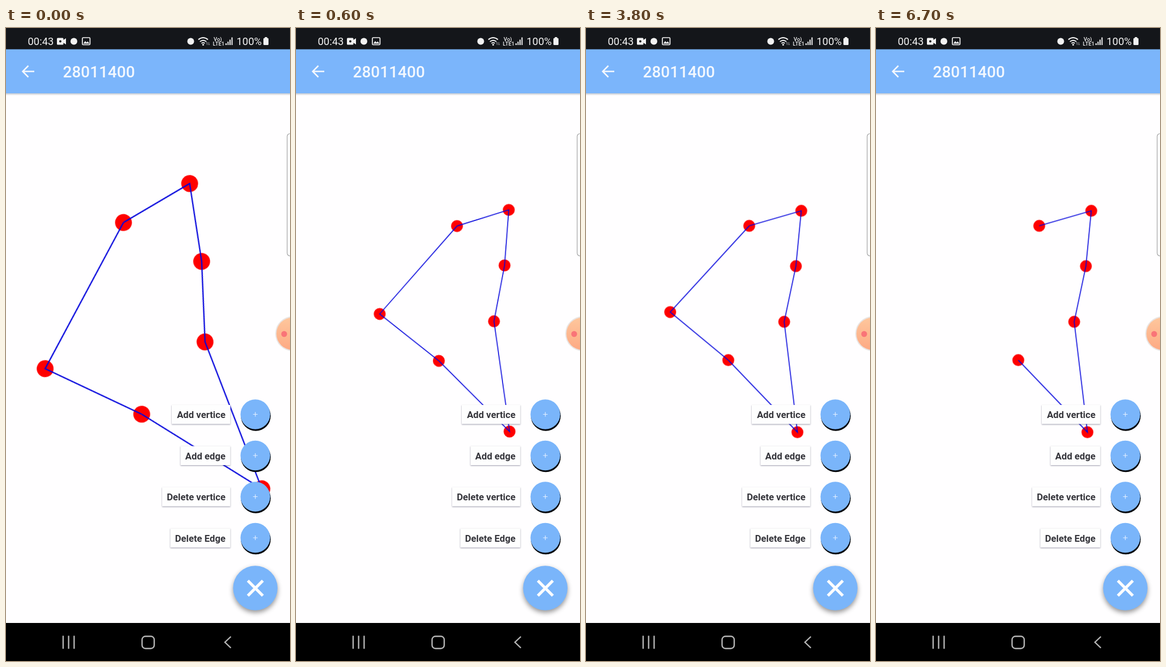
These frames come from a looping animation (502x1115 px, 8 s). An HTML page:

```html
<!DOCTYPE html>
<html lang="en">
<head>
<meta charset="utf-8">
<title>Graph editor</title>
<style>
html, body { margin: 0; width: 100%; height: 100%; overflow: hidden; background: #fffeff; }
svg { display: block; width: 502px; height: 1115px; font-family: Roboto, "Noto Sans", sans-serif; }

.dots { fill: none; stroke: #fe0000; stroke-width: 21; stroke-linecap: round; }
.edges { fill: none; stroke: #0505dc; stroke-width: 1.6; }
.label rect { fill: #fefefe; filter: drop-shadow(0 1.5px 1px rgba(0, 0, 40, .4)); }
.label text { font-size: 16.7px; font-weight: 700; fill: #36363c; text-anchor: end; }
.status { fill: #f2f2f2; }
.line { fill: none; stroke: #f2f2f2; }
.nav { fill: none; stroke: #b4b4b4; stroke-width: 2.4; }
.soft { filter: drop-shadow(0 4px 4px rgba(0, 0, 0, .42)); }

/* The pinch advances in 100 ms steps */
.graph { transform-origin: 0 0; animation: pinch 8s step-end infinite; }
.removed { animation: remove 8s step-end infinite; }

@keyframes pinch {
  0%     { transform: translate(284.5px, 524.7px) rotate(-14.35deg) scale(1.417); }
  1.25%  { transform: translate(285.6px, 521.7px) rotate(-15.2deg) scale(1.38); }
  2.5%   { transform: translate(286.9px, 518.4px) rotate(-16deg) scale(1.334); }
  3.75%  { transform: translate(291px, 511.5px) rotate(-14.2deg) scale(1.26); }
  5%     { transform: translate(298.5px, 499.5px) rotate(-9.5deg) scale(1.135); }
  6.25%  { transform: translate(305px, 489.8px) rotate(-4.2deg) scale(1.035); }
  7.5%   { transform: translate(308.2px, 486.4px) rotate(-1.2deg) scale(1.001); }
  8.75%  { transform: translate(308.9px, 486.4px) rotate(-.4deg) scale(1); }
  10%, 100% { transform: translate(309.2px, 486.4px) rotate(0deg) scale(1); }
}
@keyframes remove {
  0% { opacity: 1; }
  78.75%, 100% { opacity: 0; }
}
</style>
</head>
<body>
<svg viewBox="0 0 502 1115">
  <defs>
    <linearGradient id="barShade" x2="0" y2="1">
      <stop stop-color="#9fa6b0" stop-opacity=".6"/>
      <stop offset="1" stop-color="#9fa6b0" stop-opacity="0"/>
    </linearGradient>
    <linearGradient id="peach" x2="0" y2="1">
      <stop stop-color="#fec79d"/>
      <stop offset="1" stop-color="#fda983"/>
    </linearGradient>
    <g id="mini">
      <circle cx="441.5" cy="2.8" r="26.4" fill="#05080d"/>
      <circle cx="440.7" r="26.2" fill="#7ab5fa"/>
      <path d="M436.7 0h8M440.7-4v8" stroke="#e4f0ff" stroke-width="1.1"/>
    </g>
  </defs>
  <rect width="502" height="1115" fill="#fffeff"/>

  <g class="graph">
    <path class="dots removed" d="M-160.4 13.9h0"/>
    <path class="dots" d="M-20.7-137.9h0M71.3-164.4h0M61.8-66.9h0M41.1 31.1h0M64.5 225.6h0M-57.7 98.6h0"/>
    <path class="edges removed" d="M-20.7-137.9L-160.4 13.9L-57.7 98.6"/>
    <path class="edges" d="M-20.7-137.9L71.3-164.4L61.8-66.9L41.1 31.1L64.5 225.6L-57.7 98.6"/>
  </g>

  <!-- App bar -->
  <rect y="115" width="502" height="4" fill="url(#barShade)"/>
  <rect y="37" width="502" height="78" fill="#7bb5fb"/>
  <path d="M50 76.5H30M39.5 66.5l-10 10 10 10" fill="none" stroke="#f4f8fe" stroke-width="2.5"/>
  <text x="100.5" y="87" font-size="28" font-weight="500" fill="#f4f8fe">28011400</text>

  <!-- Status bar -->
  <rect width="502" height="37.5" fill="#14161a"/>
  <g class="status">
    <text x="38.5" y="30" font-size="18.4">00:43</text>
    <path d="M91.500 17.500h8.500q1.500 0 1.500 1.500v2l4.500-3v11l-4.500-3v2q0 1.500-1.500 1.500h-8.500q-1.500 0-1.500-1.500v-9q0-1.500 1.500-1.500z"/>
    <circle cx="96" cy="23.500" r="2" fill="#14161a"/>
    <circle cx="120" cy="23.500" r="6"/>
    <rect class="line" x="135" y="17" width="13.500" height="12.500" rx="1.500" stroke-width="1.700"/>
    <path d="M136.500 27.500l3.500-4.500 2.500 2.500 2-2 3 4z"/>
    <circle cx="326.500" cy="23.500" r="6"/>
    <path class="line" stroke-width="1.900" d="M340 20.500q8.500-7 17 0M342.800 24q5.700-4.600 11.400 0M345.500 27q3-2.200 6 0"/>
    <circle cx="348.500" cy="29.500" r="1.600"/>
    <path class="line" stroke-width="1" opacity=".6" d="M355.500 30v-5l-1.500 1.500M358.500 25v5l1.500-1.500"/>
    <text x="367" y="22.500" font-size="9.500" font-weight="500">Vo)</text>
    <text x="365.500" y="31" font-size="9.500" font-weight="500">LTE1</text>
    <path d="M388 27h2v3h-2zM391.500 24h2v6h-2zM395 20.500h2v9.500h-2z"/>
    <path d="M398.500 16.500h2v13.500h-2z"/>
    <text x="407.500" y="30" font-size="18.400">100%</text>
    <path d="M457.500 16h4v1.700h1q1.500 0 1.500 1.500v9.300q0 1.500-1.500 1.500h-6q-1.500 0-1.500-1.500v-9.300q0-1.500 1.500-1.500h1z"/>
  </g>

  <!-- Edge panel and record button -->
  <rect x="497" y="186" width="20" height="215.500" rx="5" fill="#fefefe" stroke="#a3a3a5" stroke-width="1.200"/>
  <circle cx="506.500" cy="538.500" r="30.500" fill="#e9e4e2"/>
  <circle cx="506.500" cy="538.500" r="28.500" fill="url(#peach)"/>
  <circle cx="491.700" cy="539" r="5.200" fill="#f97478"/>

  <!-- Action menu -->
  <g class="label">
    <rect x="293" y="664" width="103.500" height="33.500"/><text x="388" y="687">Add vertice</text>
    <rect x="308.500" y="736.500" width="88" height="33.500"/><text x="388" y="759.500">Add edge</text>
    <rect x="276" y="809" width="120.500" height="33.500"/><text x="388" y="832">Delete vertice</text>
    <rect x="290.500" y="881.500" width="106" height="33.500"/><text x="388" y="904.500">Delete Edge</text>
  </g>
  <use href="#mini" y="680.500"/>
  <use href="#mini" y="753"/>
  <use href="#mini" y="825.500"/>
  <use href="#mini" y="898"/>
  <circle class="soft" cx="440.700" cy="986.500" r="39.300" fill="#7ab5fa"/>
  <path d="M427.500 973.500l26.500 26.500M454 973.500L427.500 1000" stroke="#fdfeff" stroke-width="5.200"/>

  <!-- Navigation bar -->
  <rect y="1048" width="502" height="67" fill="#000"/>
  <g class="nav">
    <path d="M101 1070.500v23M110.700 1070.500v23M120.400 1070.500v23M397.500 1072l-10.500 10 10.500 10"/>
    <rect x="240.500" y="1071.500" width="21.500" height="21.500" rx="6"/>
  </g>
</svg>
</body>
</html>
```
